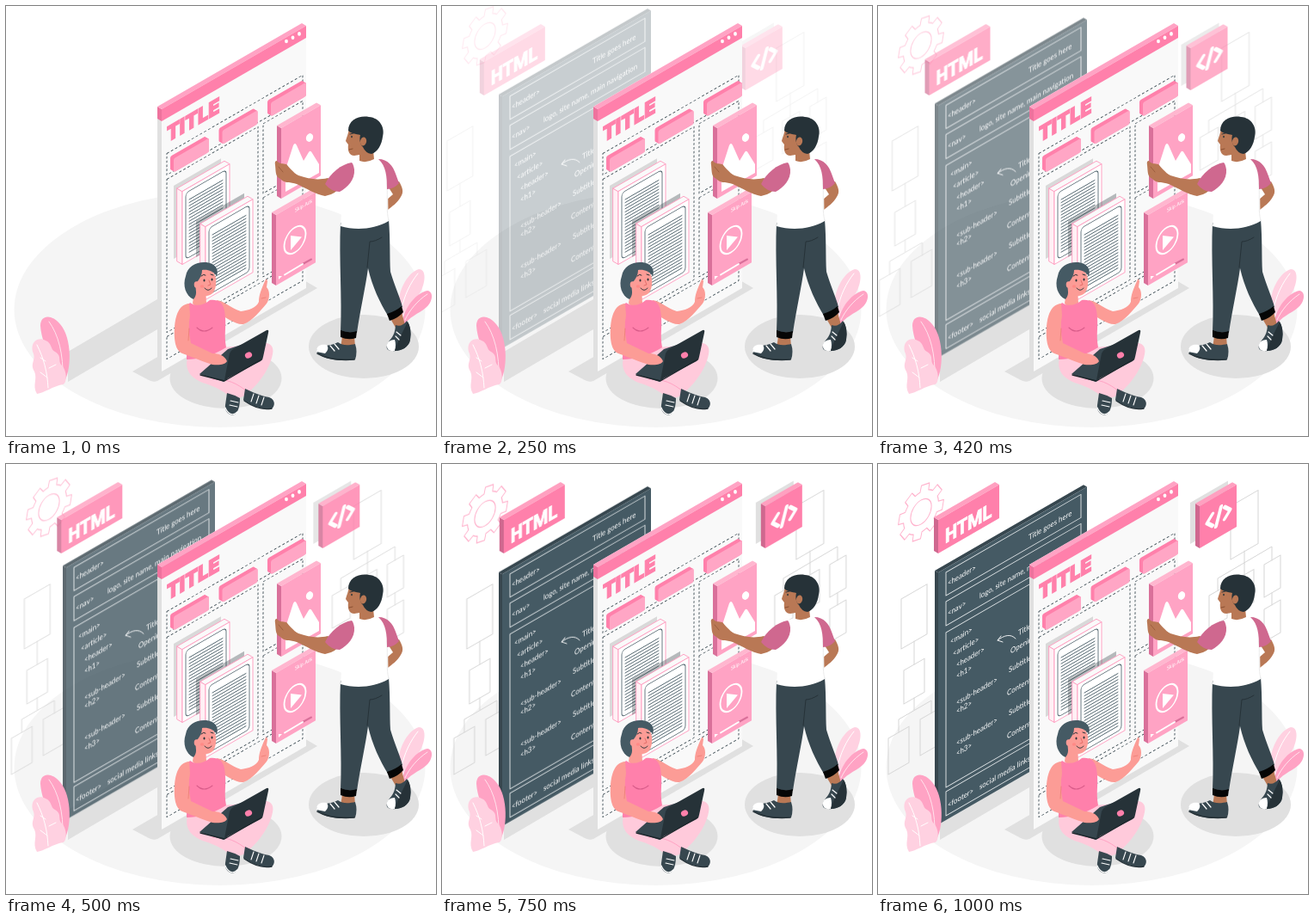
Recreate the animation shown at these times as an HTML page with a canvas. Size 500x500 px, loop 1.04 s.

```html
<!DOCTYPE html>
<html lang="en">
<head>
<meta charset="utf-8">
<title>Web page building</title>
<style>
html, body { margin: 0; width: 100%; height: 100%; overflow: hidden; background: #fff; }
canvas { display: block; width: 500px; height: 500px; }
</style>
</head>
<body>
<canvas id="stage"></canvas>
<script>
const SIZE = 500, LOOP = 1040, FPS = 24, K = 0.577;
const DPR = window.devicePixelRatio || 1;
const PINK = '#ff80ab', MID = '#ffa3c4', PALE = '#ffb3cd', MAUVE = '#cf688f';
const DARK = '#37474f', INK = '#263238', SLATE = '#455a64', GREY = '#e0e0e0', WIRE = '#d6d6d6';
const BROWN = '#b97855', SKIN = '#fc9c96';
let c;

function prepare(canvas) {
  canvas.width = canvas.height = SIZE * DPR;
  const ctx = canvas.getContext('2d');
  ctx.scale(DPR, DPR);
  ctx.lineCap = ctx.lineJoin = 'round';
  return ctx;
}

function layer(paint) {
  const canvas = document.createElement('canvas');
  c = prepare(canvas);
  paint();
  return canvas;
}

function shape(d, fill, stroke, width = 1) {
  const p = new Path2D(d);
  if (fill) { c.fillStyle = fill; c.fill(p); }
  if (stroke) { c.strokeStyle = stroke; c.lineWidth = width; c.stroke(p); }
}
const line = (d, color, width = 1) => shape(d, null, color, width);

function oval(x, y, rx, ry, fill, turn = 0) {
  c.beginPath();
  c.ellipse(x, y, rx, ry, turn, 0, Math.PI * 2);
  c.fillStyle = fill;
  c.fill();
}

// Wall-plane coordinates: x follows the screen, verticals stay vertical.
function onWall(x, y, paint) {
  c.save();
  c.transform(1, -K, 0, 1, x, y);
  paint();
  c.restore();
}

function panel(x, y, w, h, fill, stroke, r = 0, width = 1) {
  onWall(x, y, () => {
    c.beginPath();
    c.roundRect(0, 0, w, h, r);
    if (fill) { c.fillStyle = fill; c.fill(); }
    if (stroke) { c.strokeStyle = stroke; c.lineWidth = width; c.stroke(); }
  });
}

function slab(x, y, w, h, d, [face, top, side], edge) {
  const e = d * K, r = w * K;
  shape(`M${x} ${y}l${d} ${e}v${h}l${-d} ${-e}z`, side, edge);
  shape(`M${x} ${y}l${w} ${-r}l${d} ${e}l${-w} ${r}z`, top, edge);
  panel(x + d, y + e, w, h, face, edge);
}

function label(text, x, y, font, color, baseline = 'middle', heavy = 0) {
  c.save();
  c.transform(0.866, -0.5, 0, 1, x, y);
  c.font = font;
  c.fillStyle = c.strokeStyle = color;
  c.textBaseline = baseline;
  c.fillText(text, 0, 0);
  if (heavy) {
    c.lineJoin = 'miter';
    c.lineWidth = heavy;
    c.strokeText(text, 0, 0);
  }
  c.restore();
}

function ground() {
  oval(248.5, 353, 239, 137, '#f5f5f5');
  shape('M72 402L176 341V376L72 437z', GREY);
  shape('M147 425L178 407L345 318L362 328L176 436Q171 438 166 435z', GREY);
  oval(255.5, 433, 65, 35, GREY);
  oval(416, 396, 64, 37, GREY);
}

function wires() {
  const boxes = [
    [27, 157, 30, 58], [30, 240, 24, 39], [12, 319, 24, 42], [49, 297, 24, 42],
    [410, 49, 32, 62], [385, 153, 21, 38], [417, 134, 20, 38],
    [449, 117, 19, 38], [449, 169, 19, 38]
  ];
  for (const b of boxes) panel(...b, null, WIRE);
  line('M42 206V233M42 272V286M24 312V297L62 275V290', WIRE);
  line('M426 101V116M395 147V133L458 96V112M426 116V129M458 150V164', WIRE);
}

function gear() {
  c.save();
  c.transform(0.866, -0.5, 0, 1, 50, 56);
  c.strokeStyle = PALE;
  c.lineWidth = 1.2;
  c.beginPath();
  for (let i = 0; i < 8; i++) {
    const a = i * Math.PI / 4 + 0.2;
    for (const [da, r] of [[-0.25, 23.5], [-0.18, 30.5], [0.18, 30.5], [0.25, 23.5]])
      c.lineTo(r * Math.cos(a + da), r * Math.sin(a + da));
    c.arc(0, 0, 23.5, a + 0.25, a + 0.535);
  }
  c.closePath();
  c.moveTo(14, 0);
  c.arc(0, 0, 14, 0, Math.PI * 2);
  c.stroke();
  c.restore();
}

function codeBoard() {
  gear();
  slab(66, 124, 173, 293, 4, [SLATE, DARK, '#37464e']);
  for (const [y, h] of [[126, 27], [160, 28], [196, 180], [381, 28]])
    panel(79, y, 157, h, null, '#e6eaec', 0, 0.9);
  const words = [
    ['<header>', 81, 139], ['Title goes here', 175, 86],
    ['<nav>', 81, 174], ['logo, site name, main navigation', 118, 154],
    ['<main>', 84, 207], ['<article>', 87, 221], ['<header>', 91, 234], ['<h1>', 91, 247],
    ['<sub-header>', 91, 278], ['<h2>', 91, 288],
    ['<sub-header>', 91, 325], ['<h3>', 91, 337],
    ['Title', 163, 197], ['Opening', 154, 218], ['Subtitle', 152, 240],
    ['Content', 150, 267], ['Subtitle', 152, 290], ['Content', 150, 317],
    ['<footer>', 81, 397], ['social media links', 118, 376]
  ];
  for (const [s, x, y] of words) label(s, x, y, '9px Lato, sans-serif', '#fff');
  line('M160 203C154 197 147 199 139 205M143 200L139 205L145 207', '#fff', 0.9);
}

function plates() {
  const tones = [PINK, '#ffa0c0', MAUVE];
  slab(65, 62, 71, 39, 5, tones);
  label('HTML', 78, 92.5, 'bold 23px Roboto, sans-serif', '#fff', 'alphabetic', 1);
  panel(363, 45, 44, 48, GREY);
  slab(369, 46, 43, 49, 5, tones);
  onWall(396, 61, () =>
    line('M-7 -7L-13.5 0L-7 7M3 -10L-3 10M7 -7L13.5 0L7 7', '#fff', 4.2));
}

function page(x, y) {
  slab(x, y, 55, 85, 6, ['#fff', '#fafafa', '#fff0f5'], MID);
  panel(x + 10, y + 5.5, 47, 77, null, SLATE, 4, 0.8);
  for (let i = 0; i < 18; i++)
    line(`M${x + 14} ${y + 13 + i * 3.6}l39 ${-K * 39}`, SLATE, 0.9);
}

function frontBoard() {
  slab(176, 117, 168, 305, 5, ['#f9f9f9', '#fff', GREY]);
  slab(176, 117, 168, 14, 5, [PINK, MID, '#ee729d']);
  for (let i = 0; i < 3; i++) oval(326 + i * 7.5, 41 - i * 4.3, 1.9, 2.3, '#fff');
  label('TITLE', 187, 159, '900 25px Inter, sans-serif', PINK, 'alphabetic', 1.3);

  c.setLineDash([2.6, 2.2]);
  c.lineCap = 'butt';
  const cells = [[6, 175, 158, 25], [6, 205, 106, 178], [118, 205, 46, 81],
    [118, 291, 46, 92], [6, 388, 158, 26]];
  onWall(181, 0, () => {
    c.strokeStyle = DARK;
    c.lineWidth = 0.9;
    for (const r of cells) c.strokeRect(...r);
  });
  c.setLineDash([]);
  c.lineCap = 'round';

  for (let i = 0; i < 3; i++) {
    const x = 191 + i * 56.5, y = 175 - i * 32.5;
    for (let j = 0; j <= 4; j += 0.5) panel(x + j, y + j * K, 41, 16, PINK, null, 2);
    panel(x + 4, y + 4 * K, 41, 16, '#ffa6c5', null, 2);
  }

  panel(195, 209, 55, 85, '#d9d9d9');
  page(199, 212);
  panel(221, 250, 56, 42, 'rgba(38,50,56,0.32)');
  page(226, 253);

  const card = [MID, '#ffb6cf', '#d9709a'];
  slab(315, 139, 46, 82, 5, card);
  shape('M325 216V190L334 162Q336 158 338 162L346 180L352 170Q354 167 356 171L364 184V194z', '#fff');
  oval(353, 153, 4, 5, '#fff', 0.4);

  slab(309, 240, 46, 82, 5, card);
  label('Skip Ads', 336, 238, '6.2px Lato, sans-serif', '#fff');
  onWall(336, 272, () => {
    c.beginPath();
    c.ellipse(0, 0, 12.5, 14.5, 0, 0, Math.PI * 2);
    c.strokeStyle = '#fff';
    c.lineWidth = 1.8;
    c.stroke();
    shape('M-5 -8L8 1L-5 9z', '#fff');
  });
  shape('M317 314L321 314L317 318z', '#fff');
  line('M345 300L355 294.5', '#d9709a', 2);
  line('M324 312.5L345 300', '#fff', 2);
}

function leaves() {
  shape('M66 440C77 425 77 386 63 370C53 358 40 359 40 372C41 385 45 395 52 409C55 425 58 437 66 440z', MID);
  line('M50 367C61 382 67 405 66 434', '#ffe3ed');
  shape('M36 451C30 441 37 434 33 425C27 415 36 412 31 402C28 390 38 384 46 389C54 392 51 399 57 402C66 407 59 413 66 419C72 428 70 440 66 440C55 442 44 450 36 451z', '#ffd1e1');
  line('M36 394C44 410 48 425 49 444M40 426L48 432M46 413L40 409M50 421L58 417', '#fff');
  shape('M457 356C453 335 466 310 480 306C488 306 488 318 484 328C477 345 464 350 459 366z', '#ffd1e1');
  line('M479 311C470 322 463 337 460 352', '#fff');
  shape('M460 372C462 350 478 333 490 331C498 332 496 345 488 351C480 358 468 361 462 373z', MID);
  line('M490 335C478 343 469 354 464 365', '#ffe3ed');
}

function man() {
  // Feet and legs
  shape('M391 384L405 384L406 396L389 398z', BROWN);
  shape('M446 362L460 356L464 371L453 374z', BROWN);
  shape('M361 401C363 394 377 396 386 391C392 396 401 394 406 393Q409 402 406 411C390 414 365 411 361 401z', DARK);
  shape('M361 402C361 394 367 393 373 394C375 397 375 400 371 404z', '#fff');
  line('M362 404C374 411 392 412 405 411', INK, 1.6);
  line('M377 395L382 401M382 393L387 399', '#fff', 1.2);
  shape('M443 395C445 387 452 387 453 371Q460 374 466 366Q472 373 470 388C469 398 457 402 448 401Q441 400 443 395z', DARK);
  shape('M443 396C442 391 447 388 452 388Q454 394 452 401Q443 402 443 396z', '#fff');
  shape('M452 401C456 387 463 377 467 367Q472 375 470 388C468 397 460 401 452 401z', INK);
  line('M454 379L459 383M453 384L457 388', '#fff', 1.2);
  shape('M389 252L445 248C447 272 446 294 447 309C452 326 459 341 461 350L444 360C435 345 426 327 421 305C418 327 412 353 408 380L389 379C391 340 387 294 389 252z', DARK);
  line('M420 304L423 274Q429 274 437 269', INK, 1);
  shape('M389 377Q399 381 408 378L407 386Q398 389 389 385z', '#060606');
  shape('M443 358Q453 355 460 349L462 356Q456 363 446 366z', '#060606');

  // Arms
  shape('M443 208L457 204C461 211 463 216 459 222C455 229 449 233 444 237Q439 228 443 225L450 219z', BROWN);
  shape('M374 200C362 203 352 201 340 197C334 194 329 187 326 184C322 183 318 184 315 180Q312 180 313 185C314 194 313 198 319 201C324 207 331 204 338 207C349 212 360 219 371 221Q384 219 390 208z', BROWN);
  line('M317 187L322 193', '#95593a', 0.8);

  // Shirt
  shape('M403 181C415 178 429 177 438 178C447 187 443 208 445 250C428 260 406 261 389 256C391 239 389 224 388 209C386 197 394 187 403 181z', '#fff');
  line('M443 206C444 226 442 240 445 249', '#ebebeb', 1);
  shape('M402 182C390 184 377 194 371 207Q378 216 388 216C397 211 406 202 405 190Q404 184 402 182z', MAUVE);
  shape('M433 178C444 178 450 186 453 195L457 206Q451 213 443 213C443 198 442 186 433 178z', MAUVE);

  // Head
  shape('M399 142C398 149 396 153 395 157Q397 160 398 161C397 168 399 174 405 174L411 173L411 180Q419 183 428 178L426 158L415 140z', BROWN);
  shape('M398 145C398 132 411 127 422 129C435 130 441 142 438 152C437 161 432 170 425 172Q418 171 415 164C411 160 411 154 412 150C407 149 401 148 398 145z', INK);
  oval(415.5, 157.5, 3.6, 5, BROWN, 0.2);
  oval(402, 152, 0.8, 1.3, INK);
  line('M400 149L404 148', INK, 0.9);
  line('M399 167L403 166', '#7e4529', 0.8);
}

function girl() {
  // Raised arm
  shape('M245 342C254 343 262 352 273 355C282 354 291 351 294 344C294 336 297 329 301 320Q303 315 304 320L303 327C307 331 307 340 303 346C296 354 287 366 276 370C267 371 253 361 246 356z', SKIN);
  line('M297 340L302 339', '#ed7d75', 0.8);

  // Legs
  shape('M211 409C207 425 217 435 235 440C248 445 257 450 263 458L276 454C290 444 306 425 310 405C313 392 302 389 290 394L250 397z', '#ffcadb');
  line('M240 434C257 433 269 439 280 448', MID);

  // Shoes
  shape('M257 450Q265 452 272 456C272 465 270 472 266 475C259 477 254 471 255 464z', DARK);
  line('M255 467C258 475 264 477 269 472', '#fff', 1.2);
  line('M261 459L270 461M260 464L269 466', '#fff', 1.1);
  shape('M278 445C287 449 295 453 306 455C314 458 313 466 308 469C295 469 283 464 276 458z', DARK);
  line('M277 459C287 466 299 470 309 468', INK, 1.4);
  line('M288 451L285 460M294 453L291 462M300 455L297 464', '#fff', 1.1);

  // Body
  shape('M219 331L232 334L233 345Q225 355 217 346z', SKIN);
  shape('M214 345C221 350 230 348 237 342C246 341 252 344 254 354C257 371 253 381 256 397C240 407 222 411 210 411C211 389 207 374 208 358Q209 349 214 345z', PINK);
  line('M222 374Q230 382 240 374', '#d95c8a', 1.1);

  // Laptop
  shape('M225 428L258 399L282 391L257 434L253 437z', DARK);
  shape('M254 435L260 404Q261 401 264 399L303 377Q306 376 305 380L299 408Q299 411 296 413z', INK);
  line('M226 429L254 436L297 411', '#1b262b', 1.3);
  oval(282, 406, 4.2, 3.5, PINK, -0.5);

  // Near arm
  shape('M213 346C201 347 197 360 196 374C195 388 197 401 205 404C218 409 231 414 240 417C248 418 255 417 257 413C254 406 247 404 240 404L215 392Q211 374 214 360z', SKIN);
  line('M213 375L212 389', '#ed7d75', 0.8);

  // Head
  shape('M220 309C231 303 243 306 244 317C245 328 242 336 234 337C224 339 217 329 217 319z', SKIN);
  shape('M218 341C209 337 205 325 209 314C211 302 222 297 233 298C243 299 248 306 245 314C241 308 234 306 228 307C228 314 224 319 221 322C219 329 224 334 218 341z', SLATE);
  oval(221.5, 324, 2.8, 3.7, SKIN);
  oval(230.5, 319, 1, 1.6, INK);
  oval(239.5, 318, 1, 1.6, INK);
  line('M227 314Q230 311 232 313M238 312L241 313', INK, 1);
  line('M236 319L238 324L235 325', '#e06a66', 0.9);
  line('M231 328Q235 333 239 328', INK, 0.9);
  oval(228, 326, 2.2, 1.7, '#ff8a86');
}

const back = layer(ground);
const wireLayer = layer(wires);
const boardLayer = layer(codeBoard);
const plateLayer = layer(plates);
const front = layer(() => { frontBoard(); leaves(); man(); girl(); });
const stage = prepare(document.getElementById('stage'));

// Cubic Bezier easing with overshoot
const bezier = (s, a, b) => 3 * (1 - s) ** 2 * s * a + 3 * (1 - s) * s * s * b + s ** 3;

function ease(p) {
  if (p >= 1) return 1;
  let lo = 0, hi = 1;
  for (let i = 0; i < 24; i++) {
    const s = (lo + hi) / 2;
    if (bezier(s, 0.36, 0.5) < p) lo = s; else hi = s;
  }
  return bezier(lo, -0.01, 1.38);
}

function put(image, alpha = 1, x = 0, y = 0) {
  stage.globalAlpha = alpha;
  stage.drawImage(image, x, y, SIZE, SIZE);
}

function draw(now) {
  const step = Math.floor(((now % LOOP) + 4) * FPS / 1000);
  const k = step < 2 ? 0 : ease((step + 0.85) / FPS);
  const alpha = Math.min(1, Math.max(0, k)), shift = 30 * (k - 1);
  stage.clearRect(0, 0, SIZE, SIZE);
  put(back);
  put(wireLayer, alpha, shift, 0);
  put(boardLayer, alpha, 0, shift);
  put(plateLayer, alpha, shift, 0);
  put(front);
}

let start;
function tick(now) {
  start ??= now;
  draw(now - start);
  requestAnimationFrame(tick);
}
draw(0);
requestAnimationFrame(tick);
</script>
</body>
</html>
```
